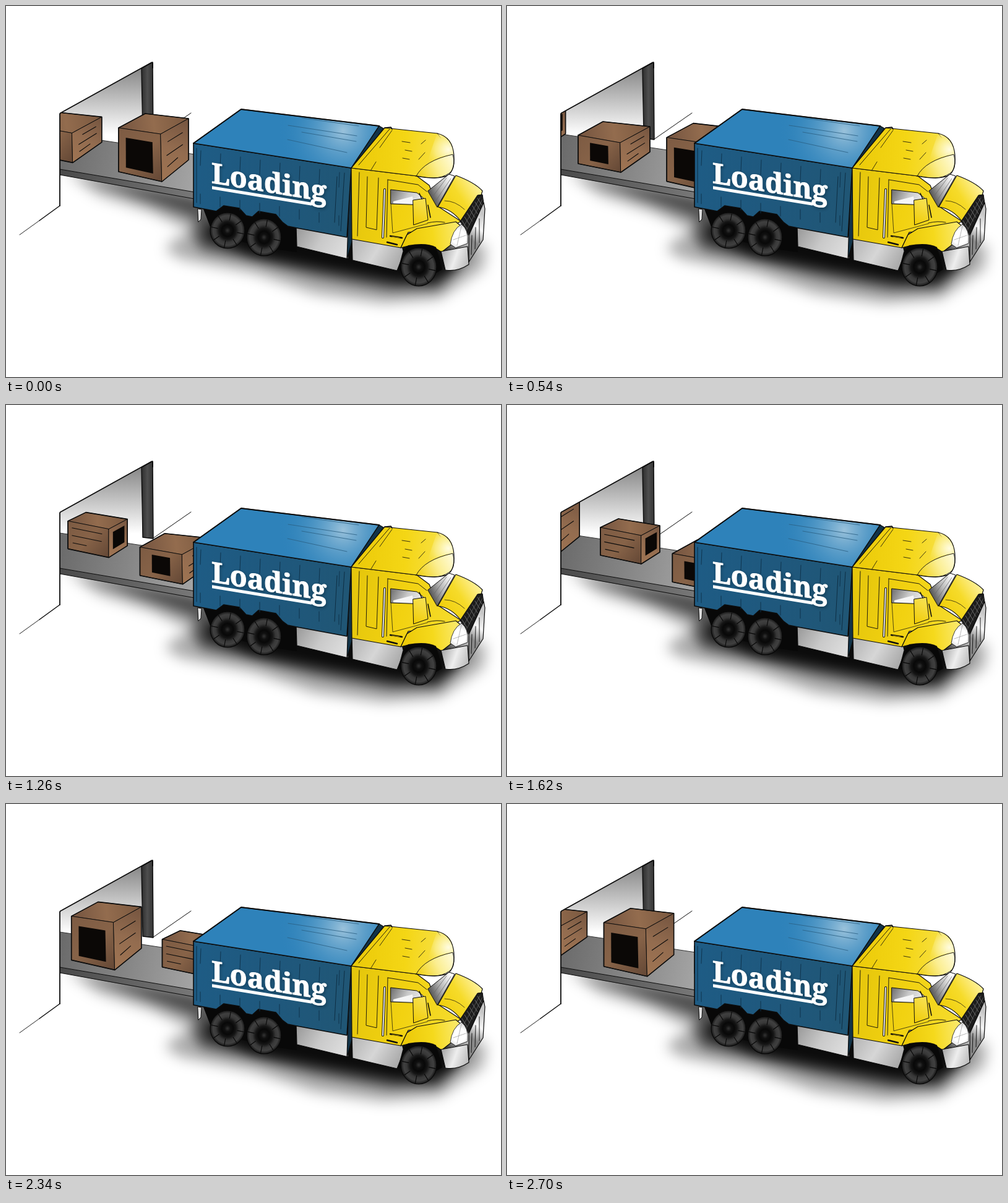
An HTML page with a canvas for the animation above (2880 ms loop, 800 px wide and 600 px high).

```html
<!DOCTYPE html>
<html lang="en">
<head>
<meta charset="utf-8">
<title>Loading</title>
<style>
html, body { margin: 0; width: 100%; height: 100%; overflow: hidden; background: #fff; }
canvas { display: block; }
</style>
</head>
<body>
<canvas id="stage" width="800" height="600"></canvas>
<script>
const W = 800, H = 600, STEP = 180, STEPS = 16, DX = 25.4, DY = 5.2;
const INK = '#0c0c0c';
const stage = document.getElementById('stage').getContext('2d');
let g = stage;

// Drawing helpers
function layer(paint) {
  const c = document.createElement('canvas');
  c.width = W; c.height = H;
  g = c.getContext('2d');
  g.lineJoin = g.lineCap = 'round';
  paint();
  g = stage;
  return c;
}
function shape(d, fill, stroke, width = 1.2) {
  const p = new Path2D(d);
  if (fill) { g.fillStyle = fill; g.fill(p); }
  if (stroke) { g.strokeStyle = stroke; g.lineWidth = width; g.stroke(p); }
}
function line(d, width = 1, color = INK) { shape(d, null, color, width); }
function stops(grad, colors) {
  colors.forEach((c, i) => grad.addColorStop(i / (colors.length - 1), c));
  return grad;
}
function lin(x0, y0, x1, y1, ...colors) {
  return stops(g.createLinearGradient(x0, y0, x1, y1), colors);
}
function rad(x, y, r, ...colors) {
  return stops(g.createRadialGradient(x, y, 0, x, y, r), colors);
}
function blurred(d, fill, px) {
  g.save();
  g.filter = `blur(${px}px)`;
  shape(d, fill);
  g.restore();
}

// Ground shadow, doorway and belt
function paintBack() {
  g.fillStyle = '#fff';
  g.fillRect(0, 0, W, H);

  g.save();
  g.beginPath(); g.rect(87, 0, W, H); g.clip();
  blurred('M95 268L310 305L600 340L776 388L772 425L700 474L610 481L500 466L400 432L285 410L258 395L268 380L298 364L235 333L150 306Z',
    'rgba(0,0,0,.32)', 11);
  blurred('M120 274L310 306L340 345L700 380L752 402L700 458L620 460L500 438L400 412L315 394L302 372L308 345L220 312Z',
    'rgba(0,0,0,.55)', 10);
  g.restore();
  blurred('M332 350L322 374L400 404L520 426L630 445L690 447L732 420L700 380Z', 'rgba(0,0,0,.85)', 9);

  shape('M87 174L219 101V232L87 212Z', lin(0, 105, 0, 208, '#8c8c8c', '#c6c6c6', '#fff'));
  shape('M219 101L237 91L238 216L221 214Z', lin(219, 0, 238, 0, '#2d2d2d', '#4e4e4e', '#333'), INK, 1.4);
  line('M237 216L299 173', 1);

  shape('M87 207L160 218L305 240V302L87 264Z', lin(87, 230, 303, 270, '#6b6b6b', '#858585', '#a3a3a3'));
  shape('M87 264L305 301V313L87 273Z', lin(87, 0, 303, 0, '#4a4a4a', '#777'));
  line('M87 207L160 218L305 240', 1, '#333');
  line('M87 264L305 301', 1);
  line('M87 273L305 312', 1.1);
}

// Frame of the doorway, over the boxes
function paintWall() {
  line('M87 323V175Q87 173 90 172L235 91.5Q237 90 237 94V100', 1.8);
  line('M87 323L54 347', 1.5);
  line('M54 347L22 370', .9);
}

function wheel(x, y, rx, ry) {
  g.save();
  g.translate(x, y);
  g.scale(rx, ry);
  g.fillStyle = rad(0, 0, 1, '#333', '#101010', '#080808', '#161616', '#383838', '#404040', '#161616');
  g.beginPath(); g.arc(0, 0, 1, 0, 7); g.fill();
  g.strokeStyle = '#080808';
  g.lineWidth = .04;
  g.stroke();
  for (let i = 0; i < 8; i++) {
    const a = i * Math.PI / 4 + .2, c = Math.cos(a), s = Math.sin(a);
    g.beginPath(); g.moveTo(c * .58, s * .58); g.lineTo(c * .95, s * .95); g.stroke();
  }
  g.restore();
}

function paintTrailer() {
  shape('M318 326L350 320L440 334L470 352V398L425 392L335 370Z', '#080808');
  shape('M310 328L316 329L315 345L311 349Z', '#ddd', INK, 1);
  shape('M469 357L553 372V409L470 389Z', lin(470, 360, 545, 405, '#999', '#c9c9c9', '#dedede'), INK);
  shape('M556 262L603 194L610 198L565 262L560 378L551 409Z', '#123348', INK);
  shape('M303 222L558 262L551 374L470 359L455 356L447 350L436 337L408 332L398 341L388 339L377 327L352 323L340 332L303 325Z',
    lin(303, 270, 556, 310, '#1e5c85', '#1f587d', '#205675'), INK, 1.6);
  shape('M303 222L380 167L603 194L558 262Z', '#2e82ba');
  shape('M303 222L380 167L603 194L558 262Z', rad(545, 202, 105, 'rgba(190,215,230,.75)', 'rgba(110,170,208,.4)', 'rgba(46,130,186,0)'), INK, 1.4);
  line('M478 181L570 194M456 193L567 210M478 204L566 219M455 216L551 237', .8, '#2a5f82');

  for (let x = 315; x < 545; x += 32) {
    const y = 224 + (x - 303) * .157;
    line(`M${x} ${y + 8}L${x - 1} ${y + 32}M${x - 1} ${y + 78}V${y + 94}`, .9, '#0e3049');
  }
  line('M547 270L541 364M535 276L531 350M308 230V318', .9, '#0c2a3e');
  line('M303 222L380 167L603 194', 2);
}

function paintTitle() {
  g.save();
  g.transform(1, .165, 0, 1, 332, 286);
  g.font = '900 45.5px "Noto Serif", serif';
  g.shadowColor = '#081c29';
  g.shadowBlur = 4;
  g.shadowOffsetX = 1;
  g.shadowOffsetY = 2;
  g.fillStyle = g.strokeStyle = '#fff';
  g.lineWidth = 1;
  g.strokeText('Loading', 0, 0);
  g.shadowColor = 'transparent';
  g.fillText('Loading', 0, 0);
  g.fillRect(1, 5, 161, 5);
  g.restore();
}

function paintCab() {
  const yellow = '#f2d211';
  // Lower skirt and side
  shape('M559 376L640 388L643 400L632 428L560 411Z', lin(560, 380, 630, 425, '#b5b5b5', '#d6d6d6', '#aaa'), INK);
  shape('M558 262L664 275L684 290L698 324L735 348L720 358L650 366L638 391L559 377Z',
    lin(560, 300, 730, 335, '#e5c60c', yellow, '#f5db2c'), INK);
  // Roof with fairing
  shape('M558 262L612 197L697 206L722 238L708 276L664 275Z', lin(570, 235, 720, 240, '#eccb0a', '#f4d615', '#f8e250'), INK);
  shape('M697 206Q724 212 723 240Q700 242 681 255Q687 231 697 206Z', rad(715, 232, 42, '#fffce0', '#faeb7c', 'rgba(245,218,42,0)'));
  shape('M663 275Q676 250 722 240Q727 257 720 267Q704 284 663 275Z', lin(670, 272, 722, 245, '#f2d526', '#fbee91', '#fffbd8'), INK, .9);
  line('M697 206Q722 212 724 242Q725 266 715 273Q702 282 664 275', 1.2);
  line('M570 257L620 199', .9);
  line('M590 265L598 252M604 229L624 201M640 219L653 221M645 233L656 235M641 246L652 248M671 223L678 217M667 248L677 237', .8);
  line('M612 197L622 196L624 199', 1.6);

  // Windscreen and hood
  shape('M682 299L716 272L725 275L697 325Z', lin(682, 300, 721, 282, '#525252', '#b9b9b9', '#fff'), INK, 1);
  line('M689 309L712 278M694 316L719 279', .7, '#666');
  shape('M698 325L727 274Q757 285 770 299L768 306L735 348Q720 328 698 325Z',
    lin(705, 330, 765, 290, '#f0cf0d', '#f6db2a', '#fff2a0'), INK);
  line('M709 315Q726 315 741 329', .7);
  line('M681 351Q697 347 709 350', .9);

  // Fender
  shape('M638 391L648 370L664 360L727 349L738 358L722 384L704 398L693 391L650 388Z',
    lin(645, 370, 733, 360, '#ecca09', '#f5d91c', '#fbea70'), INK);
  shape('M634 425L641 398L650 387Q680 382 695 390L705 426L674 444Z', '#080808');

  // Grille and bumper
  shape('M734 348L762 306L770 305L772 319L748 371Z', '#1c1c1c', INK, 1);
  for (let i = 0; i < 7; i++) {
    const x = 737 + i * 4.2, y = 347 - i * 6;
    line(`M${x} ${y}L${x + 8} ${y + 13}`, .7, '#888');
  }
  line('M740 356L766 310M744 363L770 313', .6, '#777');
  shape('M772 318L774 328L771 378L748 414L748 371Z', lin(748, 375, 774, 340, '#8a8a8a', '#f8f8f8', '#c7c7c7'), INK);
  line('M753 371L752 402M759 358L758 393M765 344L765 383', .9);
  shape('M703 397L746 389L748 418Q730 430 710 427Z', lin(705, 400, 747, 415, '#aaa', '#eee', '#bcbcbc'), INK);
  shape('M718 385Q721 362 736 353Q748 361 746 384L727 391Z', rad(732, 374, 22, '#fff', '#fff', '#cfcfcf'), INK, .8);
  line('M723 378L743 371M729 387L736 356', .6, '#888');

  // Door, window and mirror
  line('M571 269L568 372M584 276L582 358L599 362L602 278M617 281L615 374M617 281L666 289L680 300', .9);
  shape('M622 297L664 302L674 310L678 322L622 320Z', lin(624, 300, 670, 322, '#777', '#c9c9c9', '#eee'), INK, 1);
  shape('M626 316L657 308L659 320L626 319Z', '#f5f5f5');
  line('M622 320L625 367L681 352', .7);
  shape('M658 314L678 311L682 346L659 354Z', lin(658, 350, 681, 314, '#f0cd09', '#f8e257'), INK, 1);
  line('M668 303L672 312M682 322L686 342', 1.5);
  line('M612 297L609 374', 4);
  line('M612 297L609 374', 2.2, '#ddd');
  line('M621 372L640 375M616 382L632 386', 2.4);
  line('M624 373L636 375', 1, '#b99b05');
}

function paintTruck() {
  paintTrailer();
  paintTitle();
  wheel(358, 363, 28, 29);
  wheel(417, 374, 28, 30);
  paintCab();
  wheel(667, 422, 29, 31);
}

// Corners: left, back, right, front on top; then left, front, right below
const boxes = [
  { ref: 0, before: 9, mark: 'front', area: [.17, .2, .8, .87],
    at: [[182, 197], [225, 174], [295, 182], [250, 207], [182, 268], [252, 284], [295, 249]],
    lines: [[.25, .25, .78, .25], [.2, .53, .78, .53], [.22, .78, .6, .75]] },
  { ref: 3, before: 7, mark: 'front', area: [.28, .19, .71, .81],
    at: [[115, 209], [155, 187], [231, 195], [183, 221], [115, 255], [184, 269], [231, 236]],
    lines: [[.35, .25, .8, .25], [.22, .52, .82, .52], [.24, .78, .6, .76]] },
  { ref: 9, before: 8, mark: 'right', area: [.22, .18, .84, .8],
    at: [[151, 198], [180, 184], [247, 195], [217, 211], [151, 243], [217, 257], [247, 238]],
    lines: [[.1, .22, .83, .22], [.1, .49, .82, .49], [.12, .75, .45, .75]] }
];

function mix(a, b, t) { return [a[0] + (b[0] - a[0]) * t, a[1] + (b[1] - a[1]) * t]; }
function onFace([a, b, c, d], u, v) { return mix(mix(a, b, u), mix(d, c, u), v); }
function path(points) { return 'M' + points.map(p => p.join(' ')).join('L') + 'Z'; }

function drawBox(box, step) {
  const n = (step - box.ref + box.before + STEPS * 2) % STEPS - box.before;
  const [l, k, r, f, lb, fb, rb] = box.at.map(([x, y]) => [x + n * DX, y + n * DY]);
  const faces = { front: [l, f, fb, lb], right: [f, r, rb, fb] };

  shape(path([l, k, r, f]), lin(...l, ...r, '#745440', '#936c4e', '#7a583f'), INK, 1);
  shape(path(faces.front), lin(...l, ...fb, '#7d5b43', '#876348', '#634735'), INK, 1);
  shape(path(faces.right), lin(...r, ...fb, '#74543f', '#936c4f', '#a07553'), INK, 1);

  const [u0, v0, u1, v1] = box.area, m = faces[box.mark];
  shape(path([[u0, v0], [u1, v0], [u1, v1], [u0, v1]].map(([u, v]) => onFace(m, u, v))), '#0b0806');

  const other = faces[box.mark === 'front' ? 'right' : 'front'];
  for (const [a, b, c, d] of box.lines) {
    line(path([onFace(other, a, b), onFace(other, c, d)]), 1.1);
  }
  line(path([l, k, r, rb, fb, lb]), 1.6);
}

const back = layer(paintBack), wall = layer(paintWall), truck = layer(paintTruck);
const opening = new Path2D('M87 174L237 91H500V400H87Z');
stage.lineJoin = stage.lineCap = 'round';

function frame(now) {
  const step = Math.floor(now / STEP) % STEPS;
  stage.drawImage(back, 0, 0);
  stage.save();
  stage.clip(opening);
  boxes.forEach(box => drawBox(box, step));
  stage.restore();
  stage.drawImage(wall, 0, 0);
  stage.drawImage(truck, 0, 0);
}

let start;
function tick(now) {
  start ??= now;
  frame(Math.max(0, now - start));
  requestAnimationFrame(tick);
}
frame(0);
requestAnimationFrame(tick);
</script>
</body>
</html>
```
